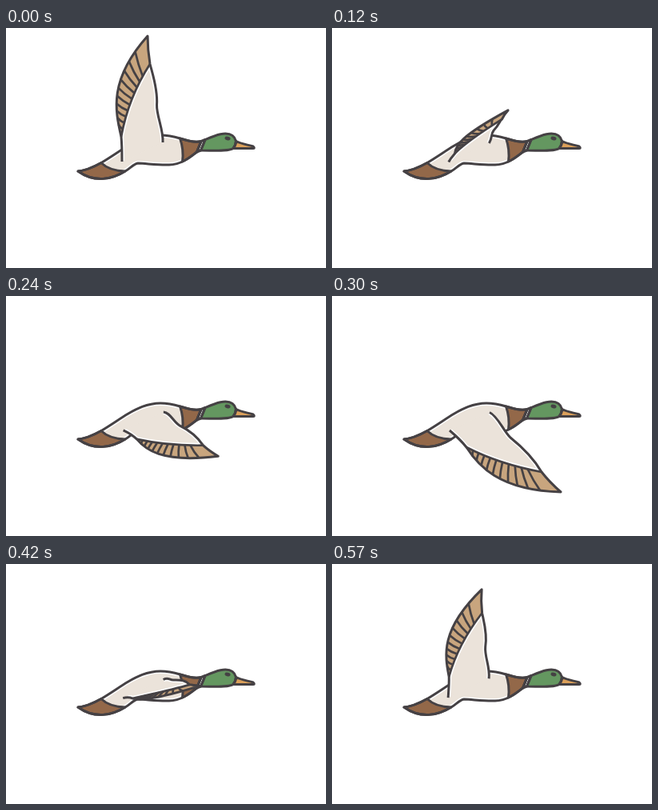
Animation of 400 by 300 pixels, one loop 0.6 s. Source, as an HTML page with a canvas:

```html
<!DOCTYPE html>
<html lang="en">
<head>
<meta charset="utf-8">
<title>Flying duck</title>
<style>
html, body { margin: 0; width: 100%; height: 100%; overflow: hidden; background: #fff; }
canvas { display: block; width: 400px; height: 300px; }
</style>
</head>
<body>
<canvas id="stage" width="400" height="300"></canvas>
<script>
const ctx = document.getElementById('stage').getContext('2d');
const LOOP = 600, STEP = 30;
const INK = '#454144', CREAM = '#ebe3da', BROWN = '#936849', TAN = '#c8a57e',
      GREEN = '#649760', ORANGE = '#dba05a';

// Body parts
const body = new Path2D(`M90 179 Q102 178 119 168.5 C131 161.5 142 153.5 152 147.5
  C163 141 176 134.2 193 134 C204 134 211 136 217.5 138 C225 140 234 144 244 141.5
  L238.5 155 C231 161 219 171 204 171 C190 171.5 177 169.5 165 169
  C159 170 156 175 149 179 C133 189 111 194 90 179 Z`);
const tail = new Path2D(`M90 179 Q102 178 119 168.5 Q129 178.5 149 179
  C133 189 111 194 90 179 Z`);
const breast = new Path2D(`M217.5 138 C225 140 234 144 244 141.5 L238.5 155
  C233 159 227 164 220.5 167 Q222.5 152 217.5 138 Z`);
const collar = new Path2D('M244 141.5 L249 139.5 L243.5 153 L238.5 155 Z');
const head = new Path2D(`M249 139.5 C255 137 262 134 268 132.7 C277 131 285 132 287.5 141.5
  Q287 147 284 150.5 C278 154.5 260 153 243.5 153 Z`);
const beak = new Path2D('M287.5 141.5 C294 145 303 146 309 148 Q311.5 150.5 309 150.6 L284 150.5 Q287 147 287.5 141.5 Z');

// Wing points: x, y raised, then x, y lowered
const wing = {
  base: [145, 167, 147, 168], b1: [145, 155, 154, 174], b2: [145, 146, 161, 180],
  root: [144, 136, 168, 189], r1: [137, 105, 182, 211], r2: [127, 66, 208, 243],
  tip: [177, 10, 286, 245], t1: [177, 20, 278, 238], t2: [178, 33, 269, 229],
  edge: [180, 45, 262, 220], e1: [183, 57, 252, 203], e2: [190, 77, 238, 189],
  knee: [188.5, 96, 223, 177], k1: [188, 110, 214, 168], k2: [197, 127, 207, 150],
  front: [196, 143, 197, 145.5],
  d1: [150, 103, 195, 203], d2: [162, 73, 230, 214]
};

function pose(p) {
  const out = {};
  for (const [name, [x, y, X, Y]] of Object.entries(wing))
    out[name] = [x + (X - x) * p, y + (Y - y) * p];
  return out;
}

// Chain of cubic curves through the given points
function curve(first, ...rest) {
  const path = new Path2D();
  path.moveTo(...first);
  for (let i = 0; i < rest.length; i += 3)
    path.bezierCurveTo(...rest[i], ...rest[i + 1], ...rest[i + 2]);
  return path;
}

function along(a, b, c, d, u) {
  const v = 1 - u;
  return [0, 1].map(i => v * v * v * a[i] + 3 * v * v * u * b[i] + 3 * v * u * u * c[i] + u * u * u * d[i]);
}

function fill(path, color) {
  ctx.fillStyle = color;
  ctx.fill(path);
}

function line(path, width = 3, color = INK) {
  ctx.lineWidth = width;
  ctx.strokeStyle = color;
  ctx.stroke(path);
}

// Cream area with a white rim just inside its outline
function plumage(area) {
  fill(area, CREAM);
  ctx.save();
  ctx.clip(area);
  line(area, 6, '#fff');
  ctx.restore();
}

function drawBody() {
  plumage(body);
  for (const [part, color] of [[tail, BROWN], [breast, BROWN], [collar, '#fff'], [head, GREEN], [beak, ORANGE]])
    fill(part, color);
  for (const part of [body, tail, breast, collar, head, beak]) line(part);
  ctx.fillStyle = INK;
  ctx.beginPath();
  ctx.ellipse(277, 138, 3.6, 2.3, 0.3, 0, 7);
  ctx.fill();
}

function drawWing(p) {
  const w = pose(p);
  const lead = [w.e1, w.e2, w.knee, w.k1, w.k2, w.front];
  const back = [w.base, w.b1, w.b2, w.root];
  const inner = curve(...back, w.d1, w.d2, w.edge, ...lead);
  const feathers = curve(w.root, w.r1, w.r2, w.tip, w.t1, w.t2, w.edge, w.d2, w.d1, w.root);
  plumage(inner);
  fill(feathers, TAN);
  for (let i = 0; i < 10; i++) {
    const u = 0.16 + i * 0.08;
    const a = along(w.root, w.r1, w.r2, w.tip, u);
    const b = along(w.root, w.d1, w.d2, w.edge, u - 0.06);
    const bar = new Path2D();
    bar.moveTo(...a);
    bar.quadraticCurveTo((a[0] + b[0]) / 2 - 1, (a[1] + b[1]) / 2 + 1, ...b);
    line(bar, 2.7);
  }
  line(curve(w.root, w.d1, w.d2, w.edge), 2.7);
  line(curve(...back, w.r1, w.r2, w.tip, w.t1, w.t2, w.edge, ...lead));
}

function draw() {
  const t = Math.floor(performance.now() % LOOP / STEP) * STEP;
  const q = 1 - Math.abs(1 - t / (LOOP / 2));
  const p = 0.9 * q + 0.1 * q * q * (3 - 2 * q); // nearly linear, slightly eased
  ctx.clearRect(0, 0, 400, 300);
  ctx.lineJoin = 'round';
  ctx.lineCap = 'butt';
  drawBody();
  drawWing(p);
  requestAnimationFrame(draw);
}
draw();
</script>
</body>
</html>
```
